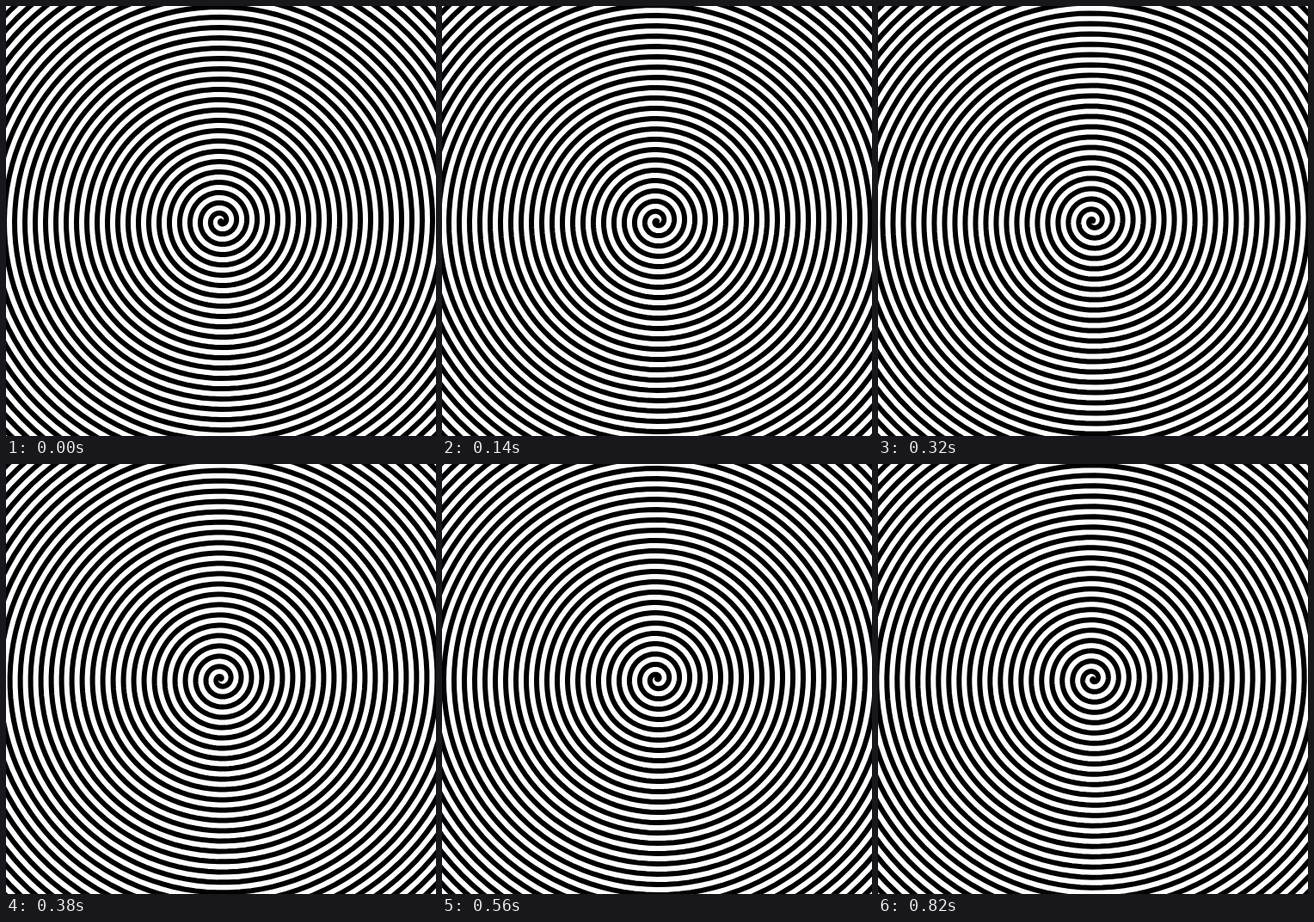
An HTML page that plays this animation: 500 px wide and 500 px high, repeating every 840 ms.

```html
<!DOCTYPE html>
<html lang="en">
<head>
<meta charset="utf-8">
<title>Spiral</title>
<style>
html, body { margin: 0; width: 100%; height: 100%; overflow: hidden; background: #fff; }
svg { display: block; width: 500px; height: 500px; }
</style>
</head>
<body>
<svg viewBox="0 0 500 500">
  <path id="arm" fill="none" stroke="#000" stroke-width="6" stroke-linecap="round"/>
</svg>
<script>
const LOOP = 840, STEP = 20, PITCH = 12, TURNS = 31, CENTER = 250;
const arm = document.getElementById('arm');

// Archimedean arm, counter-clockwise outward, starting to the left
function spiral() {
  const pts = [];
  for (let i = 0; i <= TURNS * 120; i++) {
    const turn = i / 120, a = turn * 2 * Math.PI, r = turn * PITCH;
    pts.push((-r * Math.cos(a)).toFixed(2) + ',' + (r * Math.sin(a)).toFixed(2));
  }
  return 'M' + pts.join('L');
}

function draw(ms) {
  const t = Math.floor((ms % LOOP) / STEP) * STEP / LOOP;
  arm.setAttribute('transform', `translate(${CENTER} ${CENTER}) rotate(${360 * t})`);
}

arm.setAttribute('d', spiral());
draw(0);
const start = performance.now();
(function tick() {
  draw(performance.now() - start);
  requestAnimationFrame(tick);
})();
</script>
</body>
</html>
```
